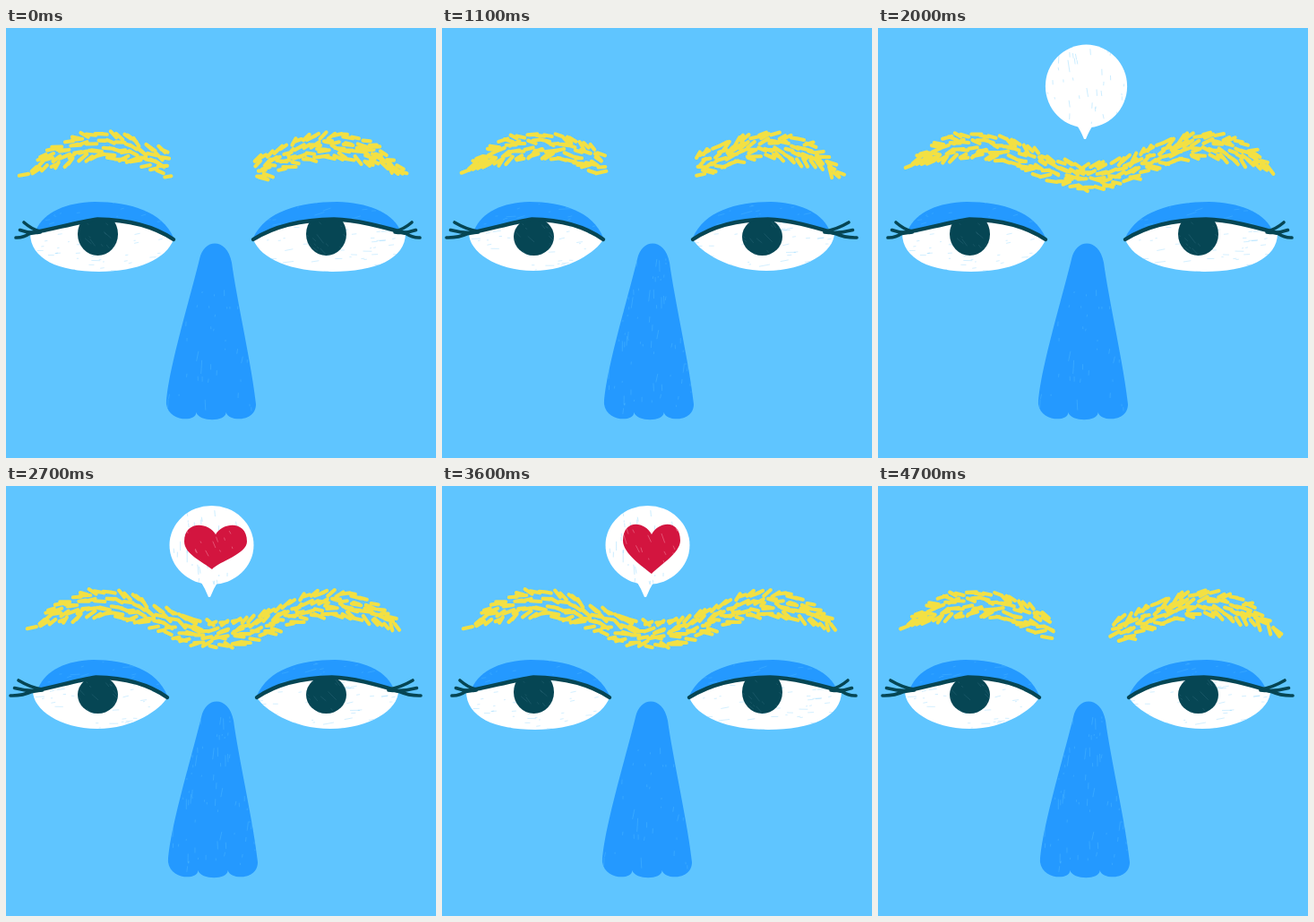
Animation, 480 px wide and 480 px high, one loop 4800 ms. Source, as an HTML page with a canvas:

```html
<!DOCTYPE html>
<html lang="en">
<head>
<meta charset="utf-8">
<title>Eyebrows in love</title>
<style>
  html, body { margin: 0; width: 100%; height: 100%; overflow: hidden; background: #5fc5ff; }
  canvas { display: block; width: 100vw; height: 100vh; }
</style>
</head>
<body>
<canvas id="stage" width="480" height="480"></canvas>
<script>
const ctx = document.getElementById('stage').getContext('2d');
const SKY = '#5fc5ff', BLUE = '#2499ff', DARK = '#064654', WHITE = '#fff';
const RED = '#d3153f', YELLOW = '#f3e043';
const STEP = 100, STEPS = 48, MIDDLE = 231;

// Three drawings of one face. Eyes run from the inner to the outer corner.
const faces = [
  { left: [187, 27], right: [276, 446], full: 1, low: 272, lash: 16,
    pupilY: 230, pupilR: 24, nose: [179, 234, 279], grain: 45 },
  { left: [180, 30], right: [280, 438], full: 0.6, low: 271, lash: 25,
    pupilY: 233, pupilR: 21, nose: [181, 236, 281], grain: 110 },
  { left: [182, 30], right: [277, 437], full: 0.8, low: 270, lash: 27,
    pupilY: 233, pupilR: 21, nose: [181, 235, 275], grain: 70 }
];
const faceOrder = [0, 1, 2, 1];

function rng(seed) {
  let s = seed * 7919 + 17;
  return () => {
    s = (s + 0x6D2B79F5) | 0;
    let t = Math.imul(s ^ (s >>> 15), 1 | s);
    t = (t + Math.imul(t ^ (t >>> 7), 61 | t)) ^ t;
    return ((t ^ (t >>> 14)) >>> 0) / 4294967296;
  };
}

const clamp = v => Math.max(0, Math.min(1, v));

function fill(path, color) {
  ctx.fillStyle = color;
  ctx.fill(path);
}

function oval(x, y, rx, ry) {
  const path = new Path2D();
  path.ellipse(x, y, rx, ry, 0, 0, 2 * Math.PI);
  return path;
}

function scaled(x, y, scale, paint) {
  ctx.save();
  ctx.translate(x, y);
  ctx.scale(scale, scale);
  ctx.translate(-x, -y);
  paint();
  ctx.restore();
}

// Thin crayon gaps inside a shape.
function grain(path, color, [x, y, w, h], count, angle, seed) {
  const rand = rng(seed);
  ctx.save();
  ctx.clip(path);
  ctx.strokeStyle = color;
  ctx.lineWidth = 0.8;
  ctx.beginPath();
  for (let i = 0; i < count; i++) {
    const px = x + rand() * w, py = y + rand() * h;
    const a = angle + (rand() - 0.5) * 0.3, len = 1 + rand() * rand() * 14;
    ctx.moveTo(px, py);
    ctx.lineTo(px + Math.cos(a) * len, py + Math.sin(a) * len);
  }
  ctx.stroke();
  ctx.restore();
}

function drawEye(face, [inner, outer], pupilX, droop, seed) {
  const at = u => inner + (outer - inner) * u;
  const curve = (path, u1, y1, u2, y2, u, y) =>
    path.bezierCurveTo(at(u1), y1, at(u2), y2, at(u), y);
  const { full, low, lash, pupilY, pupilR } = face;
  const side = Math.sign(outer - inner);

  const lid = new Path2D();
  lid.moveTo(inner, 234);
  curve(lid, 0.08, 205, 0.3, 194, 0.55, 194);
  curve(lid, 0.75, 195, 0.9, 205, 0.96, 224 + droop / 2);
  fill(lid, BLUE);
  grain(lid, 'rgba(95,197,255,.35)', [pupilX - 70, 192, 140, 30], 25, -0.2, seed);

  const rim = new Path2D();
  rim.moveTo(inner, 236);
  curve(rim, 0.13, 222, 0.3, 214, 0.53, 213.5);
  curve(rim, 0.68, 214 + droop, 0.85, 222 + droop, 1, 229);

  const white = new Path2D(rim);
  curve(white, 1, 236 + 22 * full, 0.8, low, 0.52, low);
  curve(white, 0.25, low, 0.05, 236 + 22 * full, 0, 236);
  fill(white, WHITE);
  grain(white, 'rgba(95,197,255,.35)', [pupilX - 80, 215, 160, 60], 50, -0.1, seed + 1);

  ctx.save();
  ctx.clip(white);
  const pupil = oval(pupilX, pupilY, 22.5, pupilR);
  fill(pupil, DARK);
  grain(pupil, 'rgba(95,150,170,.25)', [pupilX - 23, 210, 46, 46], 14, 0.8, seed + 2);
  ctx.restore();

  ctx.strokeStyle = DARK;
  ctx.lineWidth = 4.4;
  ctx.stroke(rim);
  ctx.lineWidth = 3.6;
  ctx.beginPath();
  for (let k = 0; k < 3; k++) {
    const x = at(0.93 + 0.07 * (k === 0)), y = 229 - k;
    const tipX = outer + side * (lash - 4.5 * k), tipY = 234 - 8.5 * k;
    ctx.moveTo(x, y);
    ctx.quadraticCurveTo((x + tipX) / 2, (y + tipY) / 2 + 3, tipX, tipY);
  }
  ctx.stroke();
}

function drawNose({ nose: [left, top, right], grain: count }, seed) {
  const path = new Path2D(), lobe = (right - left) / 3;
  path.moveTo(left, 420);
  path.bezierCurveTo(left + 1, 385, top - 28, 300, top - 18, 258);
  path.bezierCurveTo(top - 13, 234, top + 13, 234, top + 18, 262);
  path.bezierCurveTo(top + 23, 300, right - 4, 380, right, 420);
  for (let k = 2; k >= 0; k--) {
    const x = left + lobe * k;
    path.bezierCurveTo(x + lobe, 440, x + 3, 440, x, k ? 429 : 420);
  }
  fill(path, BLUE);
  grain(path, 'rgba(95,197,255,.4)', [180, 245, 100, 180], count, 1.65, seed);
}

// One wave with a crest over each eye, falling off at the outer tails.
function browY(x) {
  const tail = Math.max(0, Math.abs(x - MIDDLE) - 185);
  return 148.5 - 17.5 * Math.cos(2 * Math.PI * (x - 108) / 257) + tail * 0.25;
}

function drawBrows(gap, seed) {
  const rand = rng(seed);
  const start = 27 - gap * 0.2, end = 449 + gap * 0.1;
  ctx.strokeStyle = YELLOW;
  ctx.lineWidth = 4.1;
  ctx.beginPath();
  for (let x = start + 5; x < end - 3; x += 7.4) {
    const half = 12 * clamp(Math.min(x - start, end - x) / 50);
    const rows = half < 3 ? 1 : half < 8 ? 3 : 4;
    const side = x < MIDDLE ? 1 : -1;
    for (let r = 0; r < rows; r++) {
      const v = rows > 1 ? 1 - 2 * r / (rows - 1) : 0;
      const cx = x + (rand() - 0.5) * 8;
      const cy = browY(cx) - v * half + (rand() - 0.5) * 4;
      const slope = Math.atan2(browY(cx + 8) - browY(cx - 8), 16);
      const a = slope + side * v * 0.35 + (rand() - 0.5) * 0.8;
      const len = 3.5 + rand() * 2.5;
      if (gap && Math.abs(cx - MIDDLE) < gap + 5) continue;
      const dx = Math.cos(a) * len, dy = Math.sin(a) * len;
      ctx.moveTo(cx - dx, cy - dy);
      ctx.lineTo(cx + dx, cy + dy);
    }
  }
  ctx.stroke();
}

function drawBubble(boil, scale) {
  const x = 229.5 + 1.5 * boil, y = 66 - 0.5 * boil;
  const rx = 47 - 0.7 * boil, ry = 44 + 1.2 * boil, tail = 227 + 2 * boil;
  // The tail is broad while the bubble is small, so it starts as a drop.
  const w = Math.min(40, 10 / scale);
  const base = y + ry * Math.sqrt(1 - (w / rx) ** 2) - 3;
  scaled(MIDDLE, 124, scale, () => {
    const path = oval(x, y, rx, ry), tip = new Path2D();
    tip.moveTo(tail - w, base);
    tip.quadraticCurveTo(tail - w / 2, 114, tail - 1, 124);
    tip.lineTo(tail + 1, 124);
    tip.quadraticCurveTo(tail + w / 2, 114, tail + w, base);
    fill(path, WHITE);
    fill(tip, WHITE);
    grain(path, 'rgba(95,197,255,.4)', [x - rx, y - ry, 2 * rx, 2 * ry], 40, 1.5, 90 + boil);
  });
}

// The beat swaps a tall heart for a wide one.
function drawHeart(wide, scale) {
  const x = 234, half = 32 + 3 * wide, top = 43 + wide, mid = top + 18;
  const tip = x - 4 * wide, low = 98 - 5 * wide;
  scaled(x, 68, scale, () => {
    const path = new Path2D();
    path.moveTo(x, 54);
    path.bezierCurveTo(x - 8, top - 4, x - half, top - 6, x - half, mid);
    path.bezierCurveTo(x - half, mid + 14, tip - 10, low - 8, tip, low);
    path.bezierCurveTo(tip + 8, low - 9, x + half, mid + 14, x + half, mid);
    path.bezierCurveTo(x + half, top - 6, x + 8, top - 4, x, 54);
    fill(path, RED);
    grain(path, 'rgba(255,190,205,.45)', [198, 42, 72, 56], 18, 1.2, 100 + wide);
  });
}

function draw(i) {
  const f = faceOrder[i % 4], face = faces[f], boil = i % 3;
  ctx.fillStyle = SKY;
  ctx.fillRect(0, 0, 480, 480);
  ctx.lineCap = ctx.lineJoin = 'round';

  drawNose(face, 40 + f);
  drawEye(face, face.left, 102.5, 3, 60 + f * 10);
  drawEye(face, face.right, 357.5, 0, 65 + f * 10);

  // Brows meet, the bubble swells, the heart beats, then all goes back.
  const apart = clamp(Math.max(17 - i, i - 43) / 5);
  drawBrows(45 * apart ** 2.2, 5 + boil);
  const bubble = clamp(Math.min(i - 17, 43 - i) / 3) ** 1.6;
  if (bubble) drawBubble(boil, bubble);
  const heart = clamp(Math.min(i - 20, 41 - i) / 3);
  if (heart) drawHeart(i % 2, heart);
}

let shown = -1;
const origin = performance.now();
function tick() {
  const i = Math.floor((performance.now() - origin) / STEP) % STEPS;
  if (i !== shown) draw(shown = i);
  requestAnimationFrame(tick);
}
tick();
</script>
</body>
</html>
```
